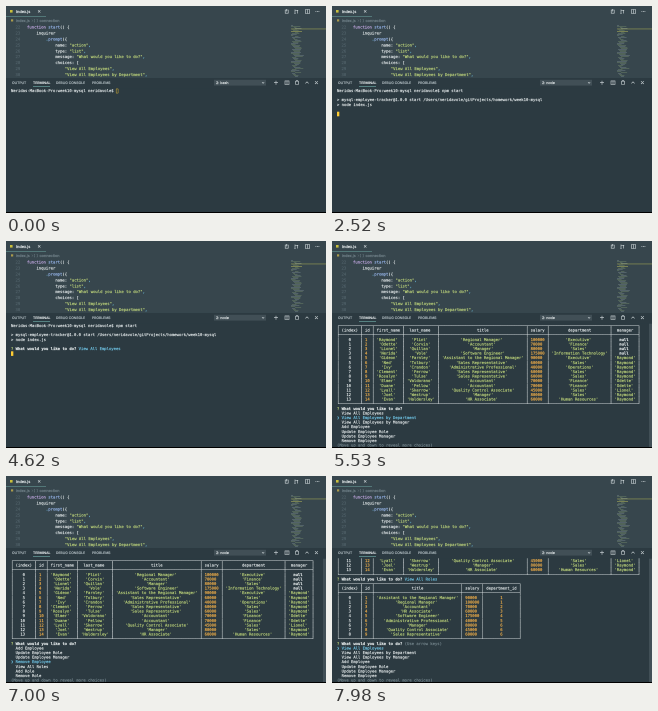
An HTML page with a canvas for the animation above (8000 ms loop, 320 px wide and 207 px high).

```html
<!DOCTYPE html>
<html lang="en">
<head>
<meta charset="utf-8">
<title>Employee tracker in the terminal</title>
<style>
html, body { margin: 0; height: 100%; overflow: hidden; background: #2c3a41; }
canvas { display: block; width: 320px; height: 207px; }
</style>
</head>
<body>
<canvas width="320" height="207"></canvas>
<script>
const LOOP = 8000, WIDTH = 320, HEIGHT = 207;
const MONO = '"DejaVu Sans Mono", monospace', SANS = 'Inter, sans-serif';
const EDITOR_BG = '#37464d', BG = '#2c3a41', WHITE = '#eef3f4', DIM = '#788990', GREEN = '#c6dd7e',
  ORANGE = '#ffb74a', CYAN = '#74cdf0', BLUE = '#9dbdf5', PURPLE = '#cdb0ee', YELLOW = '#ffcc33';

// Everything is drawn at double size, then halved for soft small text
const view = document.querySelector('canvas').getContext('2d');
const buffer = document.createElement('canvas');
buffer.width = WIDTH * 2;
buffer.height = HEIGHT * 2;
const ctx = buffer.getContext('2d');
ctx.scale(2, 2);

// Terminal grid
const LEFT = 5, TOP = 82.7, ROW = 4.6, BASELINE = 3.3, SIZE = 3.875, ADVANCE = 0.602, CELL = SIZE * ADVANCE;

// Timeline in ms
const FOCUS = 280, ENTER = 2240, PROCESS = 2310, BANNER = 2520, MENU = 2870,
  PICK_1 = 4620, TABLE_1 = 4690, PICK_2 = 7700, TABLE_2 = 7840;
const KEYS = [910, 1120, 1190, 1260, 1400, 1470, 1610, 1750, 1890];
const DOWNS = [5530, 5810, 6090, 6440, 6720, 6930, 7350];
const EVENTS = [FOCUS, ENTER, PROCESS, BANNER, MENU, PICK_1, TABLE_1, PICK_2, TABLE_2, ...KEYS, ...DOWNS];
const passed = (times, t) => times.filter(time => time <= t).length;

const HOST = 'Neridas-MacBook-Pro:week10-mysql neridavole$ ';
const COMMAND = 'npm start';
const CHOICES = ['View All Employees', 'View All Employees by Department', 'View All Employees by Manager',
  'Add Employee', 'Update Employee Role', 'Update Employee Manager', 'Remove Employee',
  'View All Roles', 'Add Role', 'Remove Role', 'View All Departments'];

const DEPARTMENTS = ['Executive', 'Finance', 'Human Resources', 'Information Technology', 'Operations', 'Sales'];
const ROLES = [
  ['Assistant to the Regional Manager', 90000, 1], ['Regional Manager', 100000, 1], ['Accountant', 70000, 2],
  ['HR Associate', 60000, 3], ['Software Engineer', 175000, 4], ['Administrative Professional', 40000, 5],
  ['Manager', 80000, 6], ['Quality Control Associate', 45000, 6], ['Sales Representative', 60000, 6]];
const PEOPLE = [
  ['Raymond', 'Plint', 2, null], ['Odette', 'Corvin', 3, null], ['Lionel', 'Quillan', 7, null],
  ['Nerida', 'Vole', 5, null], ['Gideon', 'Farnley', 1, 'Raymond'], ['Ned', 'Tolbury', 9, 'Raymond'],
  ['Ivy', 'Crandon', 6, 'Raymond'], ['Clement', 'Ferrow', 9, 'Raymond'], ['Rosalyn', 'Tulse', 9, 'Raymond'],
  ['Elmer', 'Valdorano', 3, 'Odette'], ['Duane', 'Pellow', 3, 'Odette'], ['Lyall', 'Skerrow', 8, 'Lionel'],
  ['Joel', 'Westrup', 7, 'Raymond'], ['Evan', 'Haldersley', 4, 'Raymond']];

// Lays out rows the way console.table does; a line is a list of [text, colour, bold]
function table(head, data) {
  const cells = data.map((row, i) => [i, ...row].map(v => typeof v === 'string' ? `'${v}'` : String(v)));
  const widths = head.map((h, i) => Math.max(h.length, ...cells.map(row => row[i].length)) + 2);
  const rule = (l, m, r) => [[l + widths.map(w => '─'.repeat(w)).join(m) + r, WHITE]];
  const colour = (c, i) => c[0] === "'" ? GREEN : i && /^\d/.test(c) ? ORANGE : WHITE;
  const line = row => [['│', WHITE], ...row.flatMap((c, i) => {
    const pad = (widths[i] - c.length) >> 1;
    return [[(' '.repeat(pad) + c).padEnd(widths[i]), colour(c, i), c === 'null'], ['│', WHITE]];
  })];
  return [rule('┌', '┬', '┐'), line(head), rule('├', '┼', '┤'), ...cells.map(line), rule('└', '┴', '┘')];
}

const employeeTable = table(
  ['(index)', 'id', 'first_name', 'last_name', 'title', 'salary', 'department', 'manager'],
  PEOPLE.map(([first, last, role, manager], i) => {
    const [title, salary, dept] = ROLES[role - 1];
    return [i + 1, first, last, title, salary, DEPARTMENTS[dept - 1], manager];
  }));
const roleTable = table(['(index)', 'id', 'title', 'salary', 'department_id'], ROLES.map((r, i) => [i + 1, ...r]));

const question = (text, colour) => [['? ', GREEN], ['What would you like to do? ', WHITE, true], [text, colour]];

function menu(selected) {
  const first = Math.max(0, selected - 3);
  return [
    question(selected ? '' : '(Use arrow keys)', DIM),
    ...CHOICES.slice(first, first + 7).map((name, i) =>
      first + i === selected ? [['❯ ' + name, CYAN]] : [['  ' + name, WHITE]]),
    [['(Move up and down to reveal more choices)', DIM]]];
}

function terminal(t) {
  const typed = passed(KEYS, t);
  const lines = [[[HOST + COMMAND.slice(0, typed), WHITE]]];
  let cursor = t < ENTER ? [HOST.length + typed, 0] : null;
  const waiting = () => { cursor = [0, lines.length]; };
  if (t >= ENTER) lines.push([]);
  if (t >= BANNER) lines.push(
    [['> mysql-employee-tracker@1.0.0 start /Users/neridavole/gitProjects/homework/week10-mysql', WHITE]],
    [['> node index.js', WHITE]], []);
  if (t >= ENTER && t < MENU) cursor = [0, t < BANNER ? 1 : 5];
  if (t >= MENU && t < PICK_1) lines.push(...menu(0));
  if (t >= PICK_1) lines.push(question(CHOICES[0], CYAN));
  if (t >= PICK_1 && t < TABLE_1) waiting();
  if (t >= TABLE_1) lines.push(...employeeTable);
  if (t >= TABLE_1 && t < PICK_2) lines.push(...menu(passed(DOWNS, t)));
  if (t >= PICK_2) lines.push(question(CHOICES[7], CYAN));
  if (t >= PICK_2 && t < TABLE_2) waiting();
  if (t >= TABLE_2) lines.push(...roleTable, ...menu(0));
  return { lines, cursor, scroll: t < TABLE_1 ? 0 : t < TABLE_2 ? 6 : 20 };
}

// A hairline outline gives the slightly heavy look of smoothed screen text
function text(str, x, y, size, colour, family = SANS, weight = 400) {
  ctx.save();
  ctx.translate(x, y);
  ctx.scale(0.1, 0.1);
  ctx.font = `${weight} ${size * 10}px ${family}`;
  ctx.textRendering = 'geometricPrecision';
  ctx.fillStyle = ctx.strokeStyle = colour;
  ctx.lineWidth = size * 0.35;
  ctx.fillText(str, 0, 0);
  ctx.strokeText(str, 0, 0);
  ctx.restore();
}

// Each character sits in its own cell
function mono(line, x, y, size = SIZE) {
  for (const [str, colour, bold] of line)
    for (const char of str) {
      if (char !== ' ') text(char, x, y, size, colour, MONO, bold ? 700 : 400);
      x += size * ADVANCE;
    }
}

function rect(x, y, w, h, colour) {
  ctx.fillStyle = colour;
  ctx.fillRect(x, y, w, h);
}

function stroke(path, colour = '#d3dbde', width = 0.6) {
  ctx.strokeStyle = colour;
  ctx.lineWidth = width;
  ctx.stroke(new Path2D(path));
}

const CODE = [
  [0, ['function ', PURPLE], ['start', BLUE], ['() {', WHITE]],
  [4, ['inquirer', WHITE]],
  [8, ['.', CYAN], ['prompt', BLUE], ['({', WHITE]],
  [12, ['name: ', WHITE], ['"action"', GREEN], [',', CYAN]],
  [12, ['type: ', WHITE], ['"list"', GREEN], [',', CYAN]],
  [12, ['message: ', WHITE], ['"What would you like to do?"', GREEN], [',', CYAN]],
  [12, ['choices: ', WHITE], ['[', WHITE]],
  [16, ['"View All Employees"', GREEN], [',', CYAN]],
  [16, ['"View All Employees by Department"', GREEN], [',', CYAN]]];

function minimap() {
  for (let i = 0; i < 52; i++) {
    const noise = Math.abs(Math.sin(i * 12.9898) * 43758.5453) % 1;
    const indent = i % 9 < 2 ? 0 : 1 + i % 4;
    rect(285 + indent, 19 + i, 2 + noise * 8, 0.5, i % 3 ? '#6c8067' : '#6f7f86');
  }
  rect(285, 22.6, 35, 0.7, '#8d9453');
  rect(285, 25, 11, 0.6, '#a3a857');
}

function editor() {
  rect(0, 0, WIDTH, 71.2, EDITOR_BG);
  rect(4, 4, 2.6, 2.6, '#c9bf3c');
  text('index.js', 10, 6.9, 3.9, WHITE, SANS, 500);
  stroke('M32 4.2l2.4 2.4m0-2.4l-2.4 2.4');
  rect(0, 10, 40, 0.5, '#6fa8a4');
  stroke('M279.2 4h3v3.2h-3zM280.6 3v2.5M289 3.5v4m0-3h2.5v3m-3.2 0h1.4m1.1-3.2h1.4M299.5 3.5h4v4h-4zM301.5 3.5v4');
  for (let i = 0; i < 3; i++) rect(309.5 + i * 1.5, 5.2, 0.8, 0.8, '#d3dbde');

  rect(5, 13.3, 2.2, 2.2, '#a99a4c');
  text('index.js', 10, 16, 3.8, DIM);
  stroke('M25.8 13.6l1 1l-1 1M29 13.4h-.8v2.6h.8m1.6-2.6h.8v2.6h-.8', DIM, 0.4);
  text('connection', 33.5, 16, 3.8, DIM);

  CODE.forEach(([indent, ...line], i) => {
    const y = 22.7 + i * 5.9;
    mono([[String(22 + i), '#53646c']], 9.5, y, 3.92);
    mono(line, 21 + indent * 2.36, y, 3.92);
  });
  minimap();
}

function panelBar(t) {
  rect(0, 71.2, WIDTH, 11, BG);
  rect(0, 71.2, WIDTH, 0.4, '#465860');
  for (const [label, x, active] of [['OUTPUT', 6], ['TERMINAL', 27, true], ['DEBUG CONSOLE', 50], ['PROBLEMS', 86]])
    text(label, x, 77.9, 3.4, active ? WHITE : '#b3bfc4', SANS, 500);
  rect(27, 80, 17, 0.5, '#80cbc4');
  rect(208, 73.8, 52, 5.8, '#414f56');
  text(t < PROCESS ? '2: bash' : '2: node', 210, 77.9, 3.6, WHITE);
  stroke('M256 76.2l1.1 1.1l1.1-1.1M268 76.7h4m-2-2v4M279 74.9h4v3.6h-4zM281 74.9v3.6'
    + 'M289.3 75.2h3.4m-3 0v3.3h2.6v-3.3m-1.8 0v-.6h1v.6M299.4 77.4l1.6-1.6l1.6 1.6M309 75.2l2.8 2.8m0-2.8l-2.8 2.8');
}

function drawTerminal(t) {
  const { lines, cursor, scroll } = terminal(t);
  lines.slice(scroll).forEach((line, i) => mono(line, LEFT, TOP + i * ROW + BASELINE));
  if (scroll) rect(317, TOP, 3, HEIGHT - TOP, '#414f56');
  if (!cursor) return;
  const x = LEFT + cursor[0] * CELL, y = TOP + (cursor[1] - scroll) * ROW;
  if (t < FOCUS) stroke(`M${x + 0.2} ${y + 0.2}h${CELL - 0.4}v${ROW - 0.4}h${0.4 - CELL}z`, YELLOW, 0.4);
  else rect(x, y, CELL, ROW, YELLOW);
}

function draw(t) {
  rect(0, 0, WIDTH, HEIGHT, BG);
  editor();
  panelBar(t);
  drawTerminal(t);
  rect(0, HEIGHT - 1, WIDTH, 1, '#000');
  view.drawImage(buffer, 0, 0, WIDTH, HEIGHT);
}

// The picture only changes when another event has passed
let shown = -1;
function tick() {
  const t = performance.now() % LOOP, step = passed(EVENTS, t);
  if (step !== shown) {
    draw(t);
    shown = step;
  }
  requestAnimationFrame(tick);
}
tick();
</script>
</body>
</html>
```
